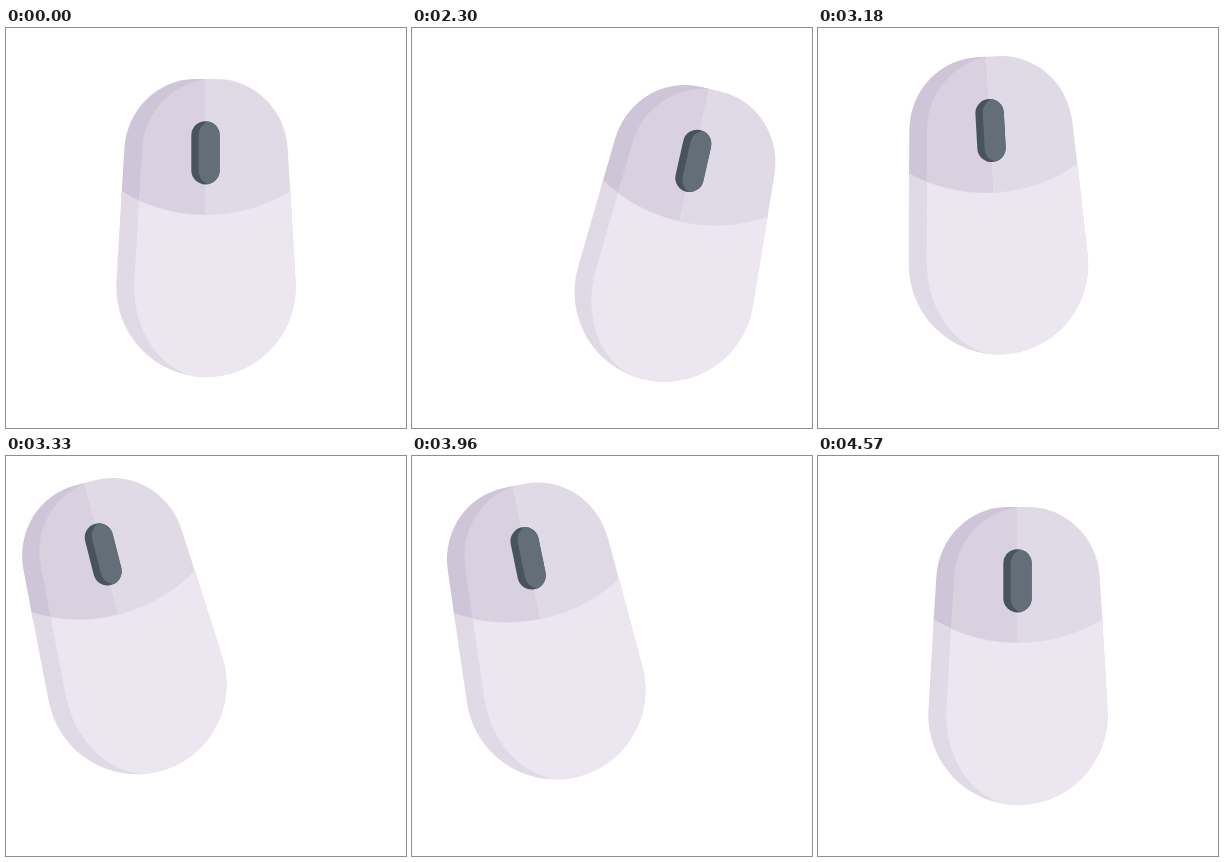
An HTML page that plays this animation: 400x400 px, repeating every 4.6 s.

```html
<!DOCTYPE html>
<html lang="en">
<head>
<meta charset="utf-8">
<title>Computer mouse</title>
<style>
  html, body { margin: 0; width: 100%; height: 100%; overflow: hidden; background: #fff; }
  svg { display: block; width: 100%; height: 100%; }
</style>
</head>
<body>
<svg viewBox="0 0 400 400">
  <g id="mouse">
    <g id="button">
      <path fill="#cfc5d9" d="M115.4 169 L118.4 120 C121 81 152 51 190 51 H199 V191 Q150 189 115.4 169Z"/>
      <path fill="#d9d1e0" d="M132.6 178 L136.3 119 C138.5 85 165 56 199 51.5 V191 Q160 189 132.6 178Z"/>
    </g>
    <path fill="#e0dae6" d="M199 51 H210 C248 51 279 81 281.6 120 L284.6 169 Q250 189 199 191Z"/>
    <path fill="#e0dae6" d="M115.7 163.3 A163.5 163.5 0 0 0 284.3 163.3 L289.6 255 A89.7 89.7 0 1 1 110.4 255Z"/>
    <path fill="#ebe6f0" d="M133 173 A163.5 163.5 0 0 0 284.3 163.3 L289.6 255 A89.7 89.7 0 0 1 187 348.2 C152 339 128.3 302 128.3 260 V255Z"/>
    <rect fill="#47545d" x="185.3" y="93.2" width="28.4" height="63.2" rx="14.2"/>
    <path fill="#646e78" d="M202 93.4 A14.2 14.2 0 0 1 213.7 107.4 V142.2 A14.2 14.2 0 0 1 202 156.2 Q192.6 152 192.6 142.2 V107.4 Q192.6 98 202 93.4Z"/>
  </g>
</svg>
<script>
  const LOOP = 4600;
  const CLICK = { every: 180, length: 155, depth: 7.2 };
  const mouse = document.getElementById('mouse');
  const button = document.getElementById('button');

  const rest = { x: 0, y: 0, angle: 0 };
  const right = { x: 0, y: -1, angle: 12.9 };
  const left = { x: -11, y: -39, angle: -15 };

  // Each move ends in a burst of clicks.
  const moves = [
    { from: rest, to: right, start: 1995, end: 2325, clickAt: 2420, clicks: 3 },
    { from: right, to: left, start: 2945, end: 3375, clickAt: 3390, clicks: 2 },
    { from: left, to: rest, start: 3840, end: 4225, clickAt: 4240, clicks: 2 }
  ];

  const clamp = v => Math.min(1, Math.max(0, v));
  const ease = v => (1 - Math.cos(Math.PI * clamp(v))) / 2;
  const mix = (a, b, p) => a + (b - a) * p;

  function pressDepth(t, { clickAt, clicks }) {
    const since = t - clickAt;
    if (since < 0 || since >= clicks * CLICK.every) return 0;
    const phase = clamp((since % CLICK.every) / CLICK.length);
    return CLICK.depth * Math.sin(Math.PI * phase) ** 2;
  }

  function draw(now) {
    const t = now % LOOP;
    const move = moves.findLast(m => t >= m.start) || moves[0];
    const p = ease((t - move.start) / (move.end - move.start));
    const [x, y, angle] = ['x', 'y', 'angle'].map(k => mix(move.from[k], move.to[k], p));

    // The swing pivots far below the mouse, like a wrist.
    mouse.setAttribute('transform', `translate(${x} ${y}) rotate(${angle} 200 496)`);
    button.setAttribute('transform', `translate(0 ${pressDepth(t, move)})`);
  }

  const begin = performance.now();
  function tick() {
    draw(performance.now() - begin);
    requestAnimationFrame(tick);
  }
  tick();
</script>
</body>
</html>
```
